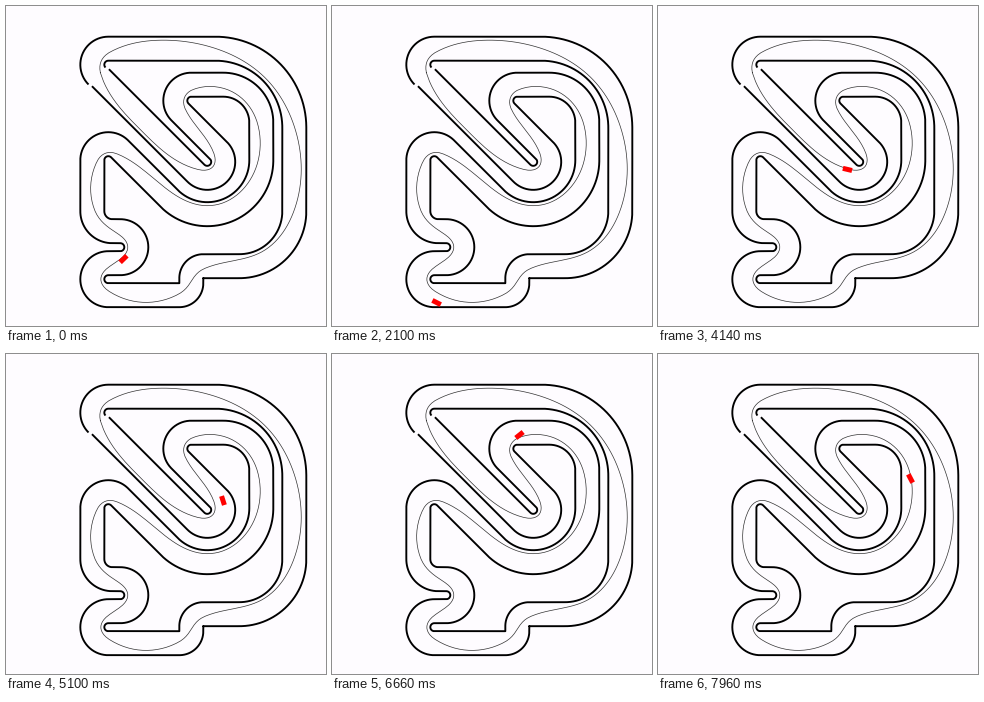
A matplotlib script that plays this animation: 320x320 px, repeating every 8 s.

```python
import numpy as np
import matplotlib.pyplot as plt
from matplotlib.animation import FuncAnimation
from matplotlib.patches import Polygon

SIZE, DPI = 320, 100
STEP, LOOP = 20, 8000
PX = 72 / DPI
HALF_WIDTH = 12      # centre line to wall
LINE_LIMIT = 8.5     # largest sideways offset of the racing line

# Centre line as moves: straight length, then turn radius and angle (right is positive)
START = (90.5, 69.5, 225)
MOVES = [
    (0, 16, 135), (107, 79, 90), (83.5, 55, 90), (36, 12, -90),
    (5, 12, 90), (71, 16, 180), (12, 16, -180), (8, 20, 90),
    (51, 16, 135), (70, 54, -135), (37.5, 38, -90), (32, 16, -135),
    (54.5, 16, 180), (135, 1, 0),
]

# Key positions of the car: time, x, y; it jumps ahead at CUT
CUT = 4100
EXIT_LEG = np.array([
    (0, 117, 252.5), (860, 96, 273), (1240, 92, 282), (1680, 96.5, 290),
    (2500, 118, 299), (2900, 142, 298), (3340, 169, 289), (CUT, 227, 254),
])
HAIRPIN_LEG = np.array([
    (CUT, 187, 162.5), (4500, 206, 166), (5020, 217, 149), (5840, 188, 115),
    (6040, 179, 106), (6240, 173, 97), (6660, 187, 80.5), (7300, 211.5, 73),
    (7540, 230, 82), (7960, 252, 124),
])


def trace(start, moves):
    """Walk along the moves; return points and unit normals to the right."""
    x, y, deg = start
    pos, head = np.array([x, y]), np.radians(deg)
    points, heads = [pos], [head]
    for length, radius, turn in moves:
        direction = np.array([np.cos(head), np.sin(head)])
        for d in np.linspace(0, length, int(length) + 1)[1:]:
            points.append(pos + direction * d)
            heads.append(head)
        pos = pos + direction * length
        r = radius * np.sign(turn)
        center = pos + r * np.array([-np.sin(head), np.cos(head)])
        sweep = np.radians(turn)
        for a in np.linspace(0, sweep, int(abs(sweep) * radius * 2) + 1)[1:]:
            points.append(center + r * np.array([np.sin(head + a), -np.cos(head + a)]))
            heads.append(head + a)
        pos, head = points[-1], head + sweep
    heads = np.array(heads)
    return np.array(points), np.column_stack([-np.sin(heads), np.cos(heads)])


def resample(points, normals, n):
    dist = np.r_[0, np.cumsum(np.hypot(*np.diff(points, axis=0).T))]
    s = np.linspace(0, dist[-1], n, endpoint=False)
    even = [np.column_stack([np.interp(s, dist, col) for col in a.T])
            for a in (points, normals)]
    even[1] /= np.hypot(*even[1].T)[:, None]
    return even


def racing_line(points, normals, rounds=4, iterations=3000):
    """Closed path of least bending that stays within LINE_LIMIT of the centre."""
    c, nrm = resample(points, normals, 300)
    eye = np.eye(len(c))
    ahead = np.roll(eye, 1, axis=1) - eye
    e = np.zeros(len(c))
    gap = np.hypot(*(ahead @ c).T)
    for _ in range(rounds):
        tangent = ahead / gap[:, None]
        mid = (gap + np.roll(gap, 1)) / 2
        bend = (tangent - np.roll(tangent, 1, axis=0)) / np.sqrt(mid)[:, None]
        b = np.vstack([bend * nrm[:, 0], bend * nrm[:, 1]])
        hess = b.T @ b
        grad = b.T @ np.r_[bend @ c[:, 0], bend @ c[:, 1]]
        rate = 1 / np.linalg.eigvalsh(hess)[-1]
        probe, k = e, 1.0
        for _ in range(iterations):
            new = np.clip(probe - rate * (hess @ probe + grad), -LINE_LIMIT, LINE_LIMIT)
            k_new = (1 + np.sqrt(1 + 4 * k * k)) / 2
            probe = new + (k - 1) / k_new * (new - e)
            e, k = new, k_new
        path = c + nrm * e[:, None]
        gap = (gap + np.maximum(np.hypot(*(ahead @ path).T), 1)) / 2
    return np.vstack([path, path[:1]])


def glide(leg, t):
    """Smooth position through the key points of a leg."""
    times, vals = leg[:, 0], leg[:, 1:]
    i = int(np.clip(np.searchsorted(times, t, side="right") - 1, 0, len(times) - 2))
    slope = np.gradient(vals, times, axis=0)
    dt = times[i + 1] - times[i]
    u = (t - times[i]) / dt
    ease = u * u * (3 - 2 * u)
    return (vals[i] + ease * (vals[i + 1] - vals[i])
            + dt * u * (1 - u) * ((1 - u) * slope[i] - u * slope[i + 1]))


def car_shape(t, length=9.4, width=5):
    leg = EXIT_LEG if t < CUT else HAIRPIN_LEG
    along = glide(leg, t + 1) - glide(leg, t - 1)
    along /= np.hypot(*along)
    across = np.array([-along[1], along[0]])
    box = np.array([(-1, -1), (1, -1), (1, 1), (-1, 1)]) * (length / 2, width / 2)
    return glide(leg, t) + box @ np.array([along, across])


fig = plt.figure(figsize=(SIZE / DPI, SIZE / DPI), dpi=DPI, facecolor="#fefcff")
ax = fig.add_axes([0, 0, 1, 1])
ax.set_xlim(-0.5, SIZE - 0.5)
ax.set_ylim(SIZE - 0.5, -0.5)
ax.axis("off")

center, normal = trace(START, MOVES)
ax.plot(*racing_line(center, normal).T, color="#333333", lw=0.7 * PX)
for side in (-HALF_WIDTH, HALF_WIDTH):
    ax.plot(*(center + side * normal).T, color="black", lw=1.9 * PX,
            solid_capstyle="butt")
car = ax.add_patch(Polygon(car_shape(0), closed=True, fc="#ff0000", ec="none", zorder=5))


def draw(frame):
    car.set_xy(car_shape(frame * STEP))
    return [car]


anim = FuncAnimation(fig, draw, frames=LOOP // STEP, interval=STEP,
                     repeat=True, repeat_delay=0, blit=False)
plt.show()
```
